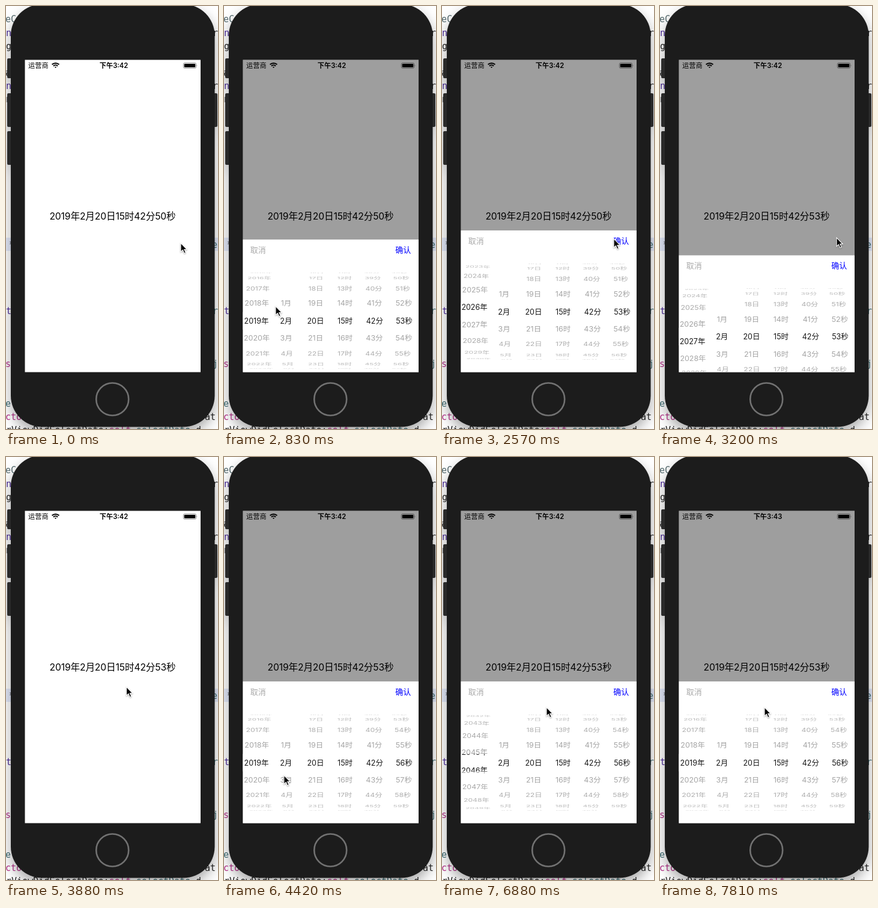
An HTML page for the animation above (8 s loop, 353 by 703 pixels).

```html
<!DOCTYPE html>
<html lang="zh-CN">
<head>
<meta charset="utf-8">
<title>Date picker</title>
<style>
html, body { margin: 0; width: 100%; height: 100%; overflow: hidden; background: #fff; }
svg { display: block; width: 100%; height: 100%; }
text { font-family: Inter, "Noto Sans CJK SC", "Noto Sans CJK", "Noto Sans", sans-serif; white-space: pre; }
.mid { text-anchor: middle; }
.code text { font: 15px "DejaVu Sans Mono", monospace; }
.status { font-size: 11.2px; }
.label { font-size: 15.6px; letter-spacing: -.1px; }
.button { font-size: 13px; }
.wheel { font-size: 12.5px; text-anchor: middle; }
</style>
</head>
<body>
<svg viewBox="0 0 353 703">
  <defs>
    <clipPath id="screen"><rect x="31.5" y="89.5" width="292.5" height="519"/></clipPath>
    <clipPath id="band"><rect x="31" y="120.5" width="294" height="29"/></clipPath>
    <filter id="shadow" x="-20%" y="-20%" width="140%" height="140%">
      <feDropShadow dx="0" dy="10" stdDeviation="11" flood-color="#000" flood-opacity=".34"/>
    </filter>
  </defs>
  <rect width="353" height="703" fill="#fff"/>
  <rect y="385" width="353" height="22" fill="#e4eafa"/>
  <g id="code" class="code"></g>

  <g filter="url(#shadow)">
    <g fill="#2b2b2b">
      <rect x="2" y="87" width="9" height="33" rx="2"/>
      <rect x="2" y="145" width="9" height="56" rx="2"/>
      <rect x="2" y="208" width="9" height="56" rx="2"/>
      <rect x="343" y="145" width="9" height="56" rx="2"/>
    </g>
    <rect x="8" y="-3" width="339.500" height="702.5" rx="52" fill="#1d1d1d"/>
  </g>
  <circle cx="177.200" cy="653.500" r="27" fill="none" stroke="#727272" stroke-width="2.6"/>

  <g clip-path="url(#screen)">
    <rect x="31" y="89" width="294" height="520" fill="#fff"/>
    <text id="label" class="label mid" x="177.500" y="354.500"></text>
    <rect id="dim" x="31" y="89" width="294" height="520" fill="#000" opacity=".38"/>
    <g class="status">
      <text x="37" y="102.800">运营商</text>
      <text id="clock" class="mid" x="179.500" y="102.800" font-weight="600"></text>
    </g>
    <g fill="none" stroke="#000" stroke-width="2">
      <path d="M76.600 97.300a8.400 8.400 0 0 1 11.800 0"/>
      <path d="M78.900 99.700a5.100 5.100 0 0 1 7.200 0"/>
      <path d="M80.900 101.400a2.300 2.300 0 0 1 3.200 0L82.500 103z" fill="#000" stroke="none"/>
    </g>
    <rect x="295.300" y="94.500" width="21.400" height="9" rx="2.500" fill="none" stroke="#000" stroke-opacity=".5" stroke-width=".8"/>
    <rect x="296.700" y="95.900" width="18.600" height="6.200" rx="1.300"/>
    <path d="M317.700 97.500q1.400 1.500 0 3z" fill-opacity=".5"/>
    <g id="panel">
      <rect x="31" width="294" height="240" fill="#fff"/>
      <text class="button" x="43.700" y="22" fill="#a8a8a8">取消</text>
      <text class="button" x="285.300" y="22" fill="#00f">确认</text>
      <g id="outer" class="wheel" fill="#a0a0a0"></g>
      <rect x="31" y="120.500" width="294" height="29" fill="#fff"/>
      <g clip-path="url(#band)"><g id="inner" class="wheel" fill="#181818"></g></g>
    </g>
  </g>

  <path id="cursor" d="M0 0V14.500L3.400 11.400 5.800 16.900 8.200 15.900 5.900 10.500H10.300Z"
    stroke="#fff" stroke-width="1.100" style="filter: drop-shadow(0 1px 1px rgba(0,0,0,.35))"/>
</svg>
<script>
const LOOP = 8000, SLIDE = 285;
const TOP = 373, BOTTOM = 609;
const RADIUS = 79.5, STEP = 21.4 * Math.PI / 180, REACH = 4;
const $ = id => document.getElementById(id);
const clamp = v => Math.min(1, Math.max(0, v));
const smooth = v => { v = clamp(v); return v * v * (3 - 2 * v); };

function add(parent, tag, attrs, content = '') {
  const el = document.createElementNS('http://www.w3.org/2000/svg', tag);
  for (const name in attrs) el.setAttribute(name, attrs[name]);
  el.textContent = content;
  return parent.appendChild(el);
}

// Code behind the phone: x, baseline, colour, text
const PINK = '#b5308a', PURPLE = '#4b2a9a', TEAL = '#3f6e74', INK = '#222';
[
  [-1, 27, '#53696d', 'eC'], [-9, 50, PURPLE, 'in'], [-9, 72, INK, 'ng'],
  [-1, 116, INK, 'a'], [-9, 138, PURPLE, 'in'], [-9, 160, INK, 'en'],
  [5, 402, INK, '*'], [-9, 512, PURPLE, 'tt'], [5, 577, INK, '.'],
  [-1, 600, PINK, 'se'], [-1, 666, TEAL, 'el'], [-1, 688, PINK, 'cto'],
  [344, 50, INK, 'r'], [344, 138, INK, 'r'], [343, 402, TEAL, 'e'],
  [344, 512, TEAL, 'r'], [344, 600, TEAL, 'j'], [331, 688, INK, 'at'],
  [-9, 709.5, INK, 'erViewDidSelectDate:'], [171.6, 709.5, PINK, 'self'],
  [207.700, 709.5, INK, '.'], [216.800, 709.5, TEAL, 'selectDate'], [307, 709.5, INK, '.d'],
].forEach(([x, y, fill, s]) => add($('code'), 'text', { x, y, fill }, s));

const columns = [
  { unit: '年', min: 1900, max: 2100 },
  { unit: '月', min: 1, max: 12 },
  { unit: '日', min: 1, max: 28 },
  { unit: '时', min: 0, max: 23 },
  { unit: '分', min: 0, max: 59 },
  { unit: '秒', min: 0, max: 59 },
];
columns.forEach((col, i) => {
  col.dx = (i - 2.5) * 49.2;
  col.layers = ['outer', 'inner'].map(id =>
    Array.from({ length: 2 * REACH + 1 }, () => add($(id), 'text', { y: 4.6 })));
});

function drawColumn(col, pos) {
  const mid = Math.round(pos);
  col.layers.forEach((rows, inner) => rows.forEach((row, i) => {
    const value = mid + i - REACH, angle = (value - pos) * STEP, cos = Math.cos(angle);
    const shown = value >= col.min && value <= col.max && cos > .03;
    row.style.display = shown ? '' : 'none';
    if (!shown) return;
    const scale = 1 - .07 * (1 - cos);
    const x = 177 + col.dx * scale, y = 135 + RADIUS * Math.sin(angle);
    row.textContent = value + col.unit;
    row.setAttribute('transform', `translate(${x} ${y}) scale(${scale} ${cos})`);
    row.setAttribute('opacity', inner ? 1 : .5 + .5 * cos);
  }));
}

// A drag by hand, then friction
function fling(t, from, start, release, drag, glide) {
  const held = drag * clamp((t - start) / (release - start));
  return from + held + (t > release ? glide * (1 - Math.exp((release - t) / 500)) : 0);
}

function yearAt(t) {
  if (t < 3800) return fling(t, 2019, 1300, 1500, 2.5, 5.4);
  const spun = fling(t, 2019, 4800, 5000, 5, 22.1);
  return spun + (2019 - spun) * smooth((t - 7290) / 510);
}

function panelAt(t) {
  const slide = start => smooth((t - start) / SLIDE);
  return BOTTOM + (TOP - BOTTOM) * (slide(590) - slide(3125) + slide(4135));
}

const path = [
  [0, 291, 394], [239, 291, 394], [240, 262, 368], [319, 262, 368], [320, 242, 350],
  [600, 242, 350], [830, 86, 499], [1300, 60, 545], [1500, 60, 470], [1700, 62, 450],
  [2280, 236, 388], [2570, 286, 387], [2750, 294, 385], [3739, 294, 385],
  [3740, 241, 385], [3879, 241, 385], [3880, 200.5, 382], [4160, 200.5, 382],
  [4420, 100, 529], [4660, 66, 555], [4800, 66, 555], [5000, 66, 412],
  [6010, 66, 412], [6410, 148, 414], [6650, 174, 416], [LOOP, 174, 416],
];

function cursorAt(t) {
  const i = path.findIndex(p => p[0] > t);
  const [a, b] = [path[i - 1], path[i]];
  const k = (t - a[0]) / (b[0] - a[0]);
  return [a[1] + (b[1] - a[1]) * k, a[2] + (b[2] - a[2]) * k];
}

function draw(t) {
  const open = (t >= 615 && t < 3430) || t >= 4175;
  $('dim').style.display = $('panel').style.display = open ? '' : 'none';
  $('panel').setAttribute('transform', `translate(0 ${panelAt(t)})`);
  $('label').textContent = `2019年2月20日15时42分${t < 3130 ? 50 : 53}秒`;
  $('clock').textContent = t < 7230 ? '下午3:42' : '下午3:43';
  const picked = [yearAt(t), 2, 20, 15, 42, t < 3800 ? 53 : 56];
  columns.forEach((col, i) => drawColumn(col, picked[i]));
  $('cursor').setAttribute('transform', `translate(${cursorAt(t)})`);
}

const began = performance.now();
function tick() {
  draw((performance.now() - began) % LOOP);
  requestAnimationFrame(tick);
}
tick();
</script>
</body>
</html>
```
